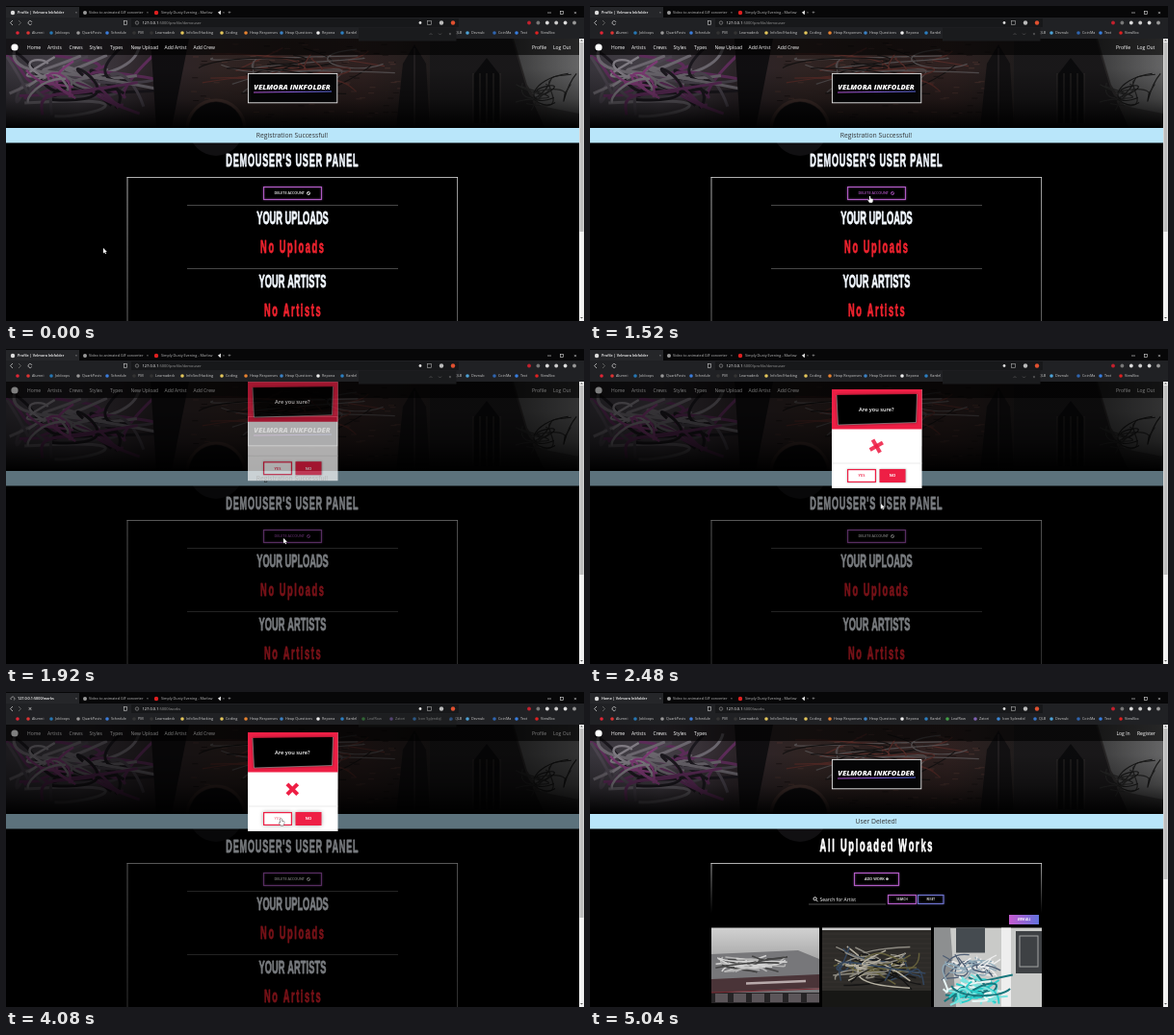
Write an HTML page with a canvas that moves like this. It is 600x328 px and loops after 5.08 s.

```html
<!DOCTYPE html>
<html lang="en">
<head>
<meta charset="utf-8">
<title>User panel walkthrough</title>
<style>
html, body { margin: 0; width: 100%; height: 100%; overflow: hidden; background: #000; }
canvas { display: block; }
</style>
</head>
<body>
<canvas id="stage" width="600" height="328"></canvas>
<script>
(() => {
const LOOP = 5080;
// Moments of the story in ms
const HOVER = 1320, BACKDROP = 1680, MODAL = 1820, ICON = 2120, YES = 3740, NAVIGATE = 3880, LOADED = 4280, REVEAL = 4360;
const RED = '#ee1f45', PURPLE = '#b95fce';
const MOUSE = [
  [0, 101, 252], [300, 102, 254], [680, 104, 251], [1280, 288, 200], [1520, 290, 198], [1900, 288, 197],
  [2200, 290, 194], [2480, 302, 161], [2820, 322, 149], [3360, 320, 147], [3560, 308, 157], [3800, 285, 132]
];

const view = document.getElementById('stage').getContext('2d');
const buffer = Object.assign(document.createElement('canvas'), { width: 600, height: 328 }).getContext('2d');
let g = view;
let seed = 1;

const random = () => (seed = seed * 16807 % 2147483647) / 2147483647;
const progress = (t, from, length) => Math.min(1, Math.max(0, (t - from) / length));

function box(x, y, w, h, fill) {
  g.fillStyle = fill;
  g.fillRect(x, y, w, h);
}

function frame(x, y, w, h, color, width = 1) {
  g.strokeStyle = color;
  g.lineWidth = width;
  g.strokeRect(x, y, w, h);
}

function line(color, width, ...points) {
  g.strokeStyle = color;
  g.lineWidth = width;
  g.beginPath();
  for (const [x, y] of points) g.lineTo(x, y);
  g.stroke();
}

function shape(fill, ...points) {
  g.fillStyle = fill;
  g.beginPath();
  for (const [x, y] of points) g.lineTo(x, y);
  g.closePath();
  g.fill();
}

function dot(x, y, r, fill) {
  g.fillStyle = fill;
  g.beginPath();
  g.arc(x, y, r, 0, 7);
  g.fill();
}

function arc(x, y, r, color, width, from = 0, to = Math.PI * 2) {
  g.strokeStyle = color;
  g.lineWidth = width;
  g.beginPath();
  g.arc(x, y, r, from, to);
  g.stroke();
}

function gradient(x0, y0, x1, y1, ...stops) {
  const blend = g.createLinearGradient(x0, y0, x1, y1);
  stops.forEach((c, i) => blend.addColorStop(i / (stops.length - 1), c));
  return blend;
}

function text(str, x, y, size, color = '#fff', align = 'left', weight = 400) {
  g.font = `${weight} ${size}px "Open Sans", sans-serif`;
  g.textAlign = align;
  g.fillStyle = color;
  g.fillText(str, x, y);
}

// Heavy narrow headline face
function headline(str, x, y, size, color, gap = 0) {
  g.save();
  g.translate(x + gap / 2, y);
  g.scale(0.52, 1);
  g.font = `bold ${size}px "Liberation Sans", Arial, sans-serif`;
  g.letterSpacing = gap / 0.52 + 'px';
  g.textAlign = 'center';
  g.fillStyle = g.strokeStyle = color;
  g.lineWidth = 0.8;
  g.lineJoin = 'round';
  g.fillText(str, 0, 0);
  g.strokeText(str, 0, 0);
  g.restore();
}

// Paints a group with one common opacity
function layer(alpha, paint) {
  buffer.clearRect(0, 0, 600, 328);
  g = buffer;
  paint();
  g = view;
  g.globalAlpha = alpha;
  g.drawImage(buffer.canvas, 0, 0);
  g.globalAlpha = 1;
}

function scribble(x, y, w, h, count, colors, width) {
  const px = () => x + random() * w, py = () => y + random() * h;
  g.lineWidth = width;
  for (let i = 0; i < count; i++) {
    g.strokeStyle = colors[i % colors.length];
    g.beginPath();
    g.moveTo(px(), py());
    g.bezierCurveTo(px(), py(), px(), py(), px(), py());
    g.stroke();
  }
}

function browser(t) {
  const loading = t >= NAVIGATE && t < LOADED;
  const works = t >= NAVIGATE;
  box(0, 0, 600, 13, '#070708');
  box(0, 1, 76, 12, '#252629');
  box(0, 12, 600, 22, '#202124');
  box(130, 13, 340, 9, '#17181a');

  if (loading) arc(7, 7, 2, '#aaa', 0.8, t / 120, t / 120 + 4.5);
  else dot(7, 7, 2.2, '#ddd');
  const title = loading ? '127.0.0.1:5000/works' : (works ? 'Home' : 'Profile') + ' | Velmora Inkfolder';
  text(title, 12, 8.4, 3.75, '#fff', 'left', 600);
  dot(82, 7, 2, '#999');
  text('Video to animated GIF converter', 86, 8.4, 3.75, '#bbb');
  dot(156, 7, 2.2, '#e02020');
  text('Simply Dusty Evening - Marlow', 161, 8.4, 3.75, '#bbb');
  shape('#ddd', [220, 6], [221, 6], [223, 4.5], [223, 9], [221, 8]);
  for (const x of [73, 147, 226]) text('×', x, 8.4, 4, '#aaa', 'center');
  text('+', 232, 9, 6, '#ccc', 'center');
  line('#ddd', 0.6, [562, 7], [566, 7]);
  frame(575.5, 5.5, 3, 3, '#ddd', 0.6);
  text('×', 591, 9, 6, '#ddd', 'center');

  line('#ddd', 0.7, [7, 15], [4.5, 17.5], [7, 20]);
  line('#777', 0.7, [13, 15], [15.5, 17.5], [13, 20]);
  if (loading) text('×', 25, 20, 7, '#ddd', 'center');
  else arc(25, 17.5, 2, '#ddd', 0.7, 0.5, 6);
  frame(122.5, 15.5, 3, 4, '#ccc', 0.6);
  arc(136, 17.5, 1.7, '#bbb', 0.5);
  text('127.0.0.1', 141.5, 19, 4, '#fff');
  text(works ? ':5000/works' : ':5000/profile/demouser', 141.5 + g.measureText('127.0.0.1').width, 19, 4, '#999');
  dot(430, 17.5, 1.4, '#ddd');
  frame(437.5, 15.5, 4, 4, '#aaa', 0.6);
  dot(452, 17.5, 2.2, '#bbb');
  dot(464, 17.5, 2.2, '#e05030');
  ['#c3202d', '#777', '#ddd', '#ccc', '#ddd', '#999'].forEach((c, i) => dot(543 + i * 9.4, 17.5, 1.9, c));

  const bookmarks = [
    ['', 16, '#e02535'], ['Alumni', 27, '#d33'], ['Jobloops', 51, '#2678b5'], ['QuarkPosts', 79, '#999'],
    ['Schedule', 109, '#3b7ddd'], ['PM', 137, '#333'], ['Learnadeck', 155, '#333'],
    ['InfoSec/Hacking', 187, '#e3c65b'], ['Coding', 228, '#e3c65b'], ['Heap Responses', 253, '#e88330'],
    ['Heap Questions', 290, '#3c82c4'], ['Repona', 328, '#eee'], ['Kardel', 353, '#2c7fc1'],
    ['LeafRow', 375, '#43a047'], ['Zatori', 404, '#8062b5'], ['Icon Splendid', 428, '#3b88d8'],
    ['QLB', 466, '#3675c9'], ['Devnub', 483, '#4da3d8'], ['CoinMa', 511, '#2f65b0'],
    ['Text', 534, '#377fe0'], ['ViewBox', 555, '#e02020']
  ];
  for (const [name, x, color] of bookmarks) {
    dot(x - 4, 28, 1.8, color);
    text(name, x, 29.4, 3.75, '#ccc');
  }
}

function findBar(t) {
  g.globalAlpha = 1 - progress(t, NAVIGATE, 360);
  box(366, 22.5, 101.5, 14, '#1a1b1d');
  line('#666', 0.6, [439.5, 30], [441, 28.5], [442.5, 30]);
  line('#666', 0.6, [449, 28.5], [450.5, 30], [452, 28.5]);
  text('×', 461, 31, 5, '#888', 'center');
  g.globalAlpha = 1;
}

function hero() {
  seed = 77;
  box(0, 34, 595, 94, gradient(0, 0, 595, 0, '#4b4750', '#5c555f', '#3a3036', '#40302e', '#3a2a28', '#3f2c2b', '#2a2626', '#2b2828', '#5a595a'));
  // Painted wall
  scribble(0, 42, 165, 75, 26, ['#7a3a75', '#8d8791', '#242028', '#625a67'], 3);
  scribble(0, 52, 75, 50, 8, ['#a64d9a', '#aaa4ae'], 2.4);
  shape('#151316', [150, 34], [190, 34], [182, 75], [172, 127], [156, 127]);
  // Brickwork
  for (let i = 0; i < 110; i++) box(190 + random() * 225, 36 + random() * 85, 6, 1, i % 2 ? '#5c3f3a' : '#241b1b');
  scribble(195, 42, 210, 50, 22, ['#6e3833', '#6c6567', '#1c1818'], 1.2);
  dot(218, 128, 28, '#111012');
  arc(218, 128, 30, '#5e4540', 3, Math.PI, 0);
  shape('#181618', [405, 128], [412, 60], [424, 40], [436, 60], [440, 128]);
  line('#4c4344', 0.8, [424, 44], [424, 126]);
  // Church and sky
  shape('#222022', [440, 128], [440, 34], [525, 34], [540, 85], [560, 128]);
  shape('#0e0e10', [485, 122], [485, 72], [499, 54], [513, 72], [513, 122]);
  for (const x of [485, 492, 499, 506, 513]) line('#504847', 0.7, [x, 70], [x, 122]);
  shape(gradient(525, 0, 595, 0, '#4f4f50', '#868687'), [527, 34], [595, 34], [595, 112], [555, 104], [541, 82]);
  scribble(525, 70, 70, 45, 10, ['#222', '#333'], 1.2);
  box(0, 34, 595, 94, gradient(0, 34, 0, 128, 'rgba(0,0,0,.25)', 'rgba(0,0,0,.25)', 'rgba(0,0,0,.5)', '#000'));
  box(0, 34, 595, 17, 'rgba(0,0,0,.62)');
}

function header(loggedIn, message) {
  box(0, 33, 600, 295, '#000');
  hero();
  dot(9, 43, 3.6, '#fff');
  const links = [['Home', 22], ['Artists', 43], ['Crews', 65.5], ['Styles', 86.5], ['Types', 108]];
  if (loggedIn) links.push(['New Upload', 129.5], ['Add Artist', 164.5], ['Add Crew', 194.5], ['Profile', 546], ['Log Out', 568]);
  else links.push(['Log In', 546.5], ['Register', 568]);
  for (const [name, x] of links) text(name, x, 44.5, 5);

  box(251, 70, 93, 31, '#050506');
  frame(251.4, 70.4, 92.4, 30.4, '#e8e8e8', 0.9);
  text('VELMORA INKFOLDER', 297, 86.5, 7.6, '#fff', 'center', 'italic 800');
  line(gradient(257, 0, 338, 0, '#b04fd0', '#5868dd'), 1, [257, 90], [338, 89]);
  box(0, 127, 595, 15.5, '#b9e6fa');
  text(message, 297, 137.2, 6.8, '#333', 'center');
}

function scrollbar(end) {
  box(595, 33, 5, 295, '#f1f1f1');
  box(595.5, 38, 4, end - 38, '#bdbdbd');
  shape('#555', [596, 36.5], [599, 36.5], [597.5, 35]);
  shape('#555', [596, 324], [599, 324], [597.5, 325.5]);
}

function panel(end) {
  const side = gradient(0, 178, 0, end, '#ddd', '#000');
  line('#ddd', 0.8, [125.6, 178.5], [469, 178.5]);
  for (const x of [126, 468.6]) line(side, 0.8, [x, 178], [x, 328]);
}

function button(x, y, w, h, label, size, color, ink = '#fff') {
  g.shadowColor = color;
  g.shadowBlur = 2;
  frame(x + 0.5, y + 0.5, w - 1, h - 1, color, 0.9);
  g.shadowBlur = 0;
  text(label, x + w / 2, y + h / 2 + size * 0.36, size, ink, 'center', 600);
}

function profilePage(t) {
  header(true, 'Registration Successful!');
  headline("DEMOUSER'S USER PANEL", 297, 166.5, 17.5, '#f2f8ff', 0.8);
  panel(520);
  const hovered = progress(t, HOVER, 120) * (1 - progress(t, 1920, 240));
  const ink = `rgb(${255 - 75 * hovered},${255 - 170 * hovered},${255 - 55 * hovered})`;
  button(267, 188, 61, 14, '', 4, PURPLE);
  text('DELETE ACCOUNT', 278.5, 196.4, 3.7, ink, 'left', 600);
  arc(314, 195, 1.6, ink, 0.7);
  line(ink, 0.6, [312.9, 193.9], [315.1, 196.1]);
  for (const y of [207.5, 273.5]) line('#666', 0.7, [188, y], [407, y]);
  headline('YOUR UPLOADS', 297.5, 227.3, 17.8, '#f2f8ff');
  headline('No Uploads', 297, 257, 17.8, '#f0232f', 1.6);
  headline('YOUR ARTISTS', 297.5, 293.3, 17.8, '#f2f8ff', 0.1);
  headline('No Artists', 297.3, 323, 17.8, '#f0232f', 1.6);
}

function photos() {
  seed = 901;
  // Shop front
  box(126, 245.5, 112, 78.5, gradient(0, 245, 0, 280, '#d2d2d2', '#a6a6a6'));
  shape('#77777a', [126, 273], [216, 269], [238, 278], [238, 324], [126, 324]);
  scribble(130, 274, 76, 18, 24, ['#d2d2d2', '#444', '#b5b5b5'], 1.6);
  shape('#4a3438', [126, 299], [238, 294], [238, 308], [126, 313]);
  line('#b8aaab', 2.5, [162, 303.5], [224, 301]);
  box(126, 313, 112, 11, '#262426');
  for (let x = 130; x < 235; x += 19) box(x, 314, 13, 9, '#5b5559');
  line('#7a2730', 1, [126, 313], [238, 309]);
  // Dark wall
  box(241, 245.5, 113, 82.5, '#2d2b28');
  box(241, 245.5, 113, 2.5, '#c8c8c8');
  for (let y = 252; y < 325; y += 5) line('#3c3934', 0.5, [241, y], [354, y]);
  box(241, 311, 113, 17, '#171715');
  scribble(247, 263, 102, 47, 34, ['#8c8980', '#33455c', '#b6b1a2', '#65603c', '#151515'], 1.5);
  // Pale building
  box(357, 245.5, 112, 82.5, '#c9cac8');
  shape('#8d8f90', [357, 245.5], [374, 245.5], [380, 328], [357, 328]);
  box(380, 245.5, 30, 26, '#454b50');
  box(427, 245.5, 10, 82, '#eee');
  box(442, 249, 27, 44, '#3e4144');
  frame(446, 254, 19, 32, '#a3a5a4', 1);
  scribble(362, 271, 65, 30, 24, ['#4e5d73', '#eee', '#8fa9b8'], 1.3);
  scribble(366, 294, 73, 32, 27, ['#29cdc9', '#7ae3df', '#18777d', '#e8f6f5'], 2);
}

function worksPage() {
  header(false, 'User Deleted!');
  headline('All Uploaded Works', 297, 166.3, 17.8, '#fff', 1.75);
  panel(230);
  button(274, 188, 47, 14, 'ADD WORK ⊕', 3.9, PURPLE);
  arc(233.6, 215.3, 1.6, '#fff', 0.9);
  line('#fff', 0.9, [234.8, 216.5], [236.5, 218.3]);
  text('Search for Artist', 238.5, 217.7, 5);
  line('#888', 0.6, [227, 221], [307, 221]);
  button(309, 211, 30, 10, 'SEARCH', 3, PURPLE);
  button(340, 211, 27.5, 10, 'RESET', 3, '#7378d8');
  box(435, 232, 31, 10, gradient(435, 0, 466, 0, '#c65bd0', '#6272dc'));
  text('VIEW ALL', 450.5, 238.2, 3.2, '#fff', 'center', 'italic 700');
  photos();
}

function modal(t) {
  g.save();
  g.translate(0, -15.6 * (1 - progress(t, MODAL, 300)) ** 1.7);
  box(251, 42, 93.5, 103, '#fff');
  box(251, 42, 93.5, 41.5, RED);
  g.shadowColor = 'rgba(0,0,0,.6)';
  g.shadowBlur = 3;
  shape('#000', [256, 48], [339.5, 47], [338.5, 76.5], [257.5, 79]);
  g.shadowBlur = 0;
  line('#aaa', 0.6, [256, 48], [257.5, 79], [338.5, 76.5], [339.5, 47]);
  text('Are you sure?', 297.3, 65, 5.6, '#fff', 'center', 600);
  line('#ddd', 0.6, [251, 119], [344.5, 119]);

  const left = (1 - progress(t, ICON, 1000)) ** 2.2;
  g.save();
  g.translate(297.3, 101.2);
  g.rotate(-left * 200 * Math.PI / 180);
  g.globalAlpha = Math.min(1, (1 - left) * 1.4);
  line(RED, 4, [-5.4, -5.4], [5.4, 5.4]);
  line(RED, 4, [-5.4, 5.4], [5.4, -5.4]);
  g.restore();

  g.shadowColor = 'rgba(0,0,0,.35)';
  g.shadowBlur = t > YES ? 4 : 2;
  box(267, 125, 30, 14, '#fff');
  box(300.5, 125, 27, 14, RED);
  g.shadowBlur = 0;
  frame(267.6, 125.6, 28.8, 12.8, RED, 1.2);
  text('YES', 282, 133.4, 4, t > YES ? '#f08a9d' : RED, 'center', 600);
  text('NO', 314, 133.4, 4, '#fff', 'center', 700);
  g.restore();
}

function loader(t) {
  box(0, 33, 595, 295, '#000');
  g.save();
  g.translate(297, 163);
  g.rotate(t / 400);
  arc(0, 0, 14.8, '#fff', 1.4);
  g.strokeStyle = '#fff';
  for (const [rx, ry, turn, width] of [[14, 12.6, 0.6, 0.9], [13, 5.5, 0.35, 1]]) {
    g.lineWidth = width;
    g.beginPath();
    g.ellipse(0, 0, rx, ry, turn, 0, 7);
    g.stroke();
  }
  g.restore();
  headline('LOADING', 297, 204.3, 17, '#fff', 1.2);
}

function cursor(t) {
  let i = 1;
  while (i < MOUSE.length - 1 && t > MOUSE[i][0]) i++;
  const [t0, x0, y0] = MOUSE[i - 1], [t1, x1, y1] = MOUSE[i];
  const k = (1 - Math.cos(Math.PI * progress(t, t0, t1 - t0))) / 2;
  g.save();
  g.translate(x0 + (x1 - x0) * k, y0 + (y1 - y0) * k);
  const hand = t > HOVER - 60 && t < BACKDROP + 100 || t > YES;
  const outline = hand
    ? [[0, 0], [1, 0], [1.2, 2.4], [3.8, 3], [3.6, 5.6], [3, 6.8], [0, 6.8], [-1.6, 4.2], [-1, 3.6], [0, 4.4]]
    : [[0, 0], [0, 5.4], [1.3, 4.3], [2.2, 6.2], [3, 5.8], [2.2, 4], [3.8, 3.9]];
  line('#222', 0.8, ...outline, outline[0]);
  shape('#fff', ...outline);
  g.restore();
}

const start = performance.now();

function draw() {
  const t = (performance.now() - start) % LOOP;
  if (t < LOADED) {
    profilePage(t);
    box(0, 33, 595, 295, `rgba(0,0,0,${0.5 * progress(t, BACKDROP, 150)})`);
    if (t > MODAL) layer(progress(t, MODAL, 150), () => modal(t));
    scrollbar(235);
    browser(t);
    findBar(t);
    cursor(t);
  } else {
    worksPage();
    const fade = (1 + Math.cos(Math.PI * progress(t, REVEAL, 600))) / 2;
    layer(fade, () => loader(t));
    scrollbar(195);
    browser(t);
  }
  requestAnimationFrame(draw);
}
draw();
})();
</script>
</body>
</html>
```
